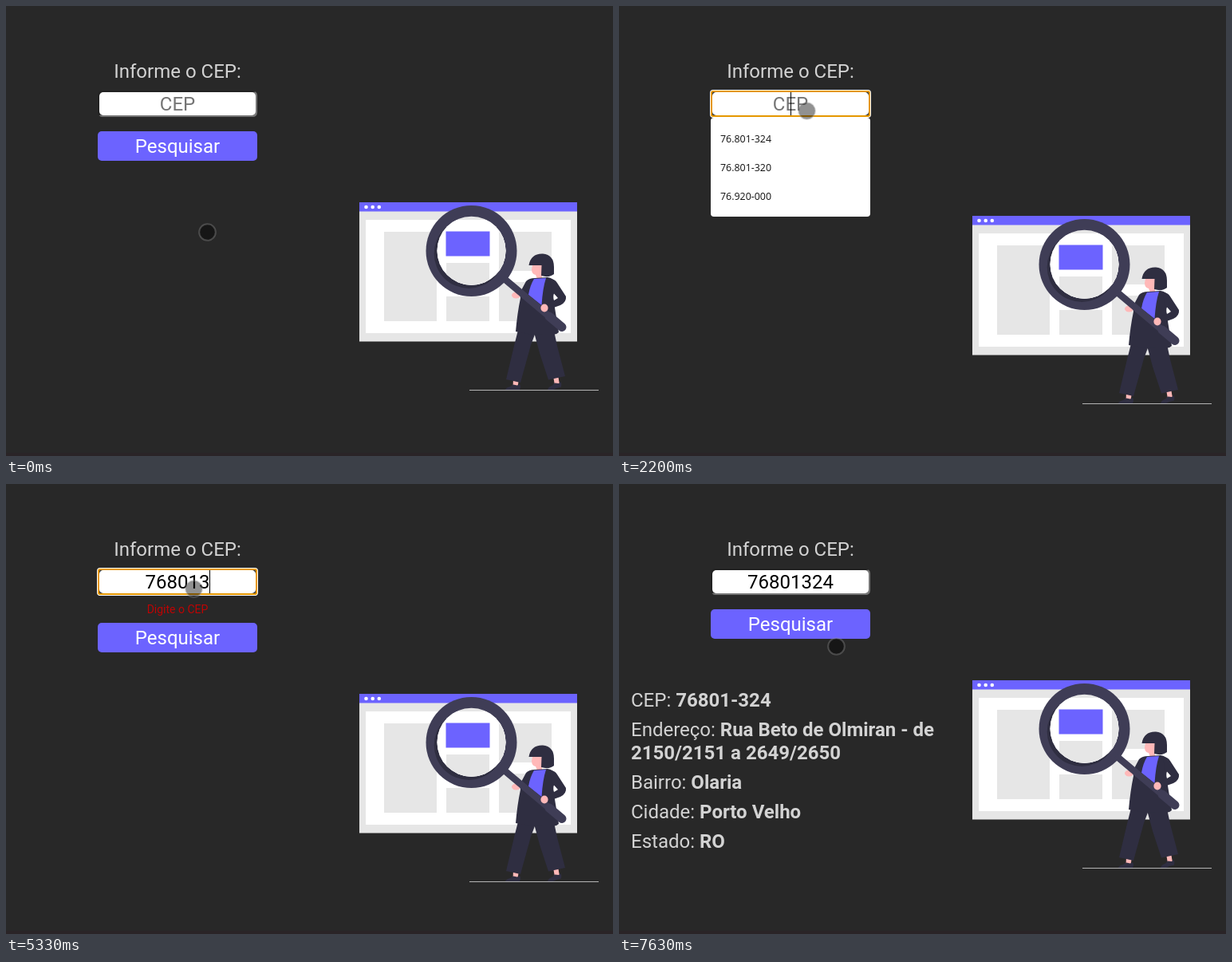
An HTML page for the animation above (8000 ms loop, 761x564 px).

```html
<!DOCTYPE html>
<html lang="pt-BR">
<head>
<meta charset="utf-8">
<title>Busca de CEP</title>
<style>
  html, body { margin: 0; width: 100%; height: 100%; overflow: hidden; background: #282828; }
  svg { display: block; width: 761px; height: 564px; }
  text { font: 24px Roboto, Arial, sans-serif; fill: #d3d3d3; }
  .mid { text-anchor: middle; }
  .bold { font-weight: 700; }
  #error { font-size: 14px; fill: #bd0404; }
  #label { fill: #fff; }
  #list text { font: 12.4px "Open Sans", "Noto Sans", sans-serif; fill: #111; }
  .paper { fill: #fff; }
  .grey { fill: #e6e6e6; }
  .violet { fill: #6c63ff; }
  .ink { fill: #2f2e41; }
  .skin { fill: #ffb8b8; }
  .steel { fill: #3f3d56; }
  .grip { stroke: #3f3d56; stroke-linecap: round; }
</style>
</head>
<body>
<svg viewBox="0 0 761 564">
  <defs>
    <clipPath id="lens"><circle cx="583.5" cy="306.7" r="43"/></clipPath>
  </defs>
  <rect width="761" height="564" fill="#282828"/>
  <rect y="560" width="761" height="4" fill="#2a2427"/>

  <text class="mid" x="215" y="90">Informe o CEP:</text>

  <g id="idle">
    <rect x="115" y="106" width="200" height="33" rx="6" fill="#222"/>
    <path d="M313 107.5Q315 109 315 112V133Q315 139 309 139H121Q118 139 116.500 137Z" fill="#767676"/>
  </g>
  <g id="focus">
    <rect class="paper" x="114" y="105" width="202" height="35" rx="4"/>
    <rect x="115" y="106" width="200" height="33" rx="3" fill="#e59700"/>
    <rect x="117" y="108" width="196" height="29" rx="1" fill="#333"/>
  </g>
  <rect class="paper" x="117" y="108" width="196" height="29" rx="5"/>
  <text id="value" class="mid" x="215" y="131"></text>
  <rect id="caret" y="108" width="1" height="29"/>

  <text id="error" class="mid" x="215" y="162">Digite o CEP</text>

  <g id="page">
    <rect id="button" class="violet" x="115" y="157" width="200" height="37" rx="5"/>
    <text id="label" class="mid" x="215" y="184">Pesquisar</text>

    <g id="window">
      <rect class="grey" x="443" y="246" width="273" height="174.500"/>
      <rect class="violet" x="443" y="246" width="273" height="11.500"/>
      <g class="paper">
        <circle cx="451.500" cy="252" r="2.300"/>
        <circle cx="459.700" cy="252" r="2.300"/>
        <circle cx="467.800" cy="252" r="2.300"/>
        <rect x="451" y="268" width="257" height="142"/>
      </g>
      <g class="grey">
        <rect x="474" y="283" width="66" height="112"/>
        <rect x="552" y="322" width="54" height="31"/>
        <rect x="552" y="364" width="54" height="31"/>
        <rect x="618" y="283" width="66" height="49"/>
        <rect x="618" y="346" width="66" height="49"/>
      </g>
      <rect class="violet" x="551.500" y="282.500" width="55" height="31"/>
    </g>

    <circle class="steel" cx="583.500" cy="307" r="57"/>
    <circle class="ink" cx="580.300" cy="310.300" r="43.600"/>
    <use href="#window" clip-path="url(#lens)"/>

    <path d="M581 481.500H743" stroke="#b4b4b4"/>
    <g class="skin">
      <path d="M636 468H643L641.500 477H635.500Z"/>
      <path d="M686 464L692 463L694 474L688 475Z"/>
      <ellipse cx="639.500" cy="362.500" rx="5.500" ry="4"/>
      <path d="M660 325H672V341L666 342L664 337Q659 336 659 330Z"/>
    </g>
    <g class="ink">
      <path d="M626 481Q627 478 632 477L636 474.500L641 475.500L644 474Q646 477 644 481Z"/>
      <path d="M679 481Q680 477 685 475.500L688 472.500L693 473L695.500 471Q697 474 696 477.500L690 479L686 481Z"/>
      <path d="M642 406L664 409L658 425L645 472L627 468L636 430Z"/>
      <path d="M662 409L687 407L691 426L701 464L680 468.500L669 435Z"/>
      <path d="M652 345Q656 341 663 341L679 340Q686 341 688 346L687 372L693 409Q689 413 683 411L660 412L639 408Q641 385 645 366L644 360Z"/>
      <path d="M682 342Q688 342 691 347L702 364Q703 371 695 375L681 380L679 373L691 366L684 357Z"/>
      <path d="M655.500 325Q658 310 673 310.500Q687 312 687 327V336Q681 341 671 338L671.500 325Z"/>
    </g>
    <path class="violet" d="M662 342L677 341Q673 353 671.500 375L655 362Q657 350 662 342Z"/>
    <path class="paper" d="M687 360.500L692 366L687 369Q685.500 364 687 360.500Z"/>
    <path class="grip" d="M626 343L682 390" stroke-width="8.500"/>
    <path class="grip" d="M681 389L697 402.500" stroke-width="11"/>
    <ellipse class="skin" cx="675" cy="378.500" rx="4.600" ry="5"/>
  </g>

  <g id="list">
    <rect class="paper" x="115" y="140" width="200" height="124" rx="4"/>
    <text x="127" y="171">76.801-324</text>
    <text x="127" y="207">76.801-320</text>
    <text x="127" y="243">76.920-000</text>
  </g>

  <g id="result">
    <text x="15" y="279">CEP: <tspan class="bold">76801-324</tspan></text>
    <text x="15" y="316">Endereço: <tspan class="bold">Rua Beto de Olmiran - de</tspan></text>
    <text class="bold" x="15" y="345">2150/2151 a 2649/2650</text>
    <text x="15" y="382">Bairro: <tspan class="bold">Olaria</tspan></text>
    <text x="15" y="419">Cidade: <tspan class="bold">Porto Velho</tspan></text>
    <text x="15" y="456">Estado: <tspan class="bold">RO</tspan></text>
  </g>

  <circle id="cursor" r="10.300" fill="#000" fill-opacity=".43" stroke="#909090" stroke-opacity=".38" stroke-width="2"/>
</svg>
<script>
  const LOOP = 8000;
  const CEP = "76801324";
  const keyTimes = [2640, 2765, 2890, 4810, 4930, 5330, 5455, 5580];
  const caretOn = [[2050, 3530], [3930, 4430], [4810, 6090], [6570, 6820]];
  const pressed = [[1130, 1250], [6820, 6990]];
  // time, x, y; no position means hidden
  const moves = [
    [0, 252.5, 283.5], [500, 250, 264], [620, 245, 224], [740, 239, 186], [860, 235.5, 171.5],
    [1650], [1900, 235.5, 131.5],
    [6090, 244, 133], [6210, 284, 143], [6330, 316, 165], [6450, 292, 193], [6570, 272.5, 203.5]
  ];

  const el = id => document.getElementById(id);
  const within = (t, a, b) => t >= a && t < b;
  const anyOf = (t, spans) => spans.some(([a, b]) => within(t, a, b));
  const show = (id, on) => el(id).setAttribute("visibility", on ? "visible" : "hidden");

  function render(t) {
    const focused = within(t, 2050, 6820);
    const failed = within(t, 1250, 7630);
    const typed = keyTimes.filter(k => t >= k).length;

    show("idle", !focused);
    show("focus", focused);
    el("value").textContent = typed ? CEP.slice(0, typed) : "CEP";
    el("value").style.fill = typed ? "#000" : "#757575";
    el("caret").setAttribute("x", Math.floor(215 + typed * 6.74));
    show("caret", anyOf(t, caretOn));

    show("error", failed);
    el("page").setAttribute("transform", `translate(0 ${failed ? 17 : 0})`);
    el("button").style.fill = anyOf(t, pressed) ? "#5d55e0" : "";

    const closing = t >= 3400;
    show("list", within(t, 2200, 3530));
    el("list").setAttribute("opacity", closing ? 0.65 : 1);
    el("list").setAttribute("transform", closing ? "translate(215 202) scale(.983) translate(-215 -202)" : "");

    show("result", t >= 7630);

    const [, x, y] = moves.filter(m => t >= m[0]).pop();
    show("cursor", x !== undefined);
    if (x !== undefined) el("cursor").setAttribute("transform", `translate(${x} ${y})`);
  }

  let start;
  function tick(now) {
    start ??= now;
    render((now - start) % LOOP);
    requestAnimationFrame(tick);
  }
  render(0);
  requestAnimationFrame(tick);
</script>
</body>
</html>
```
